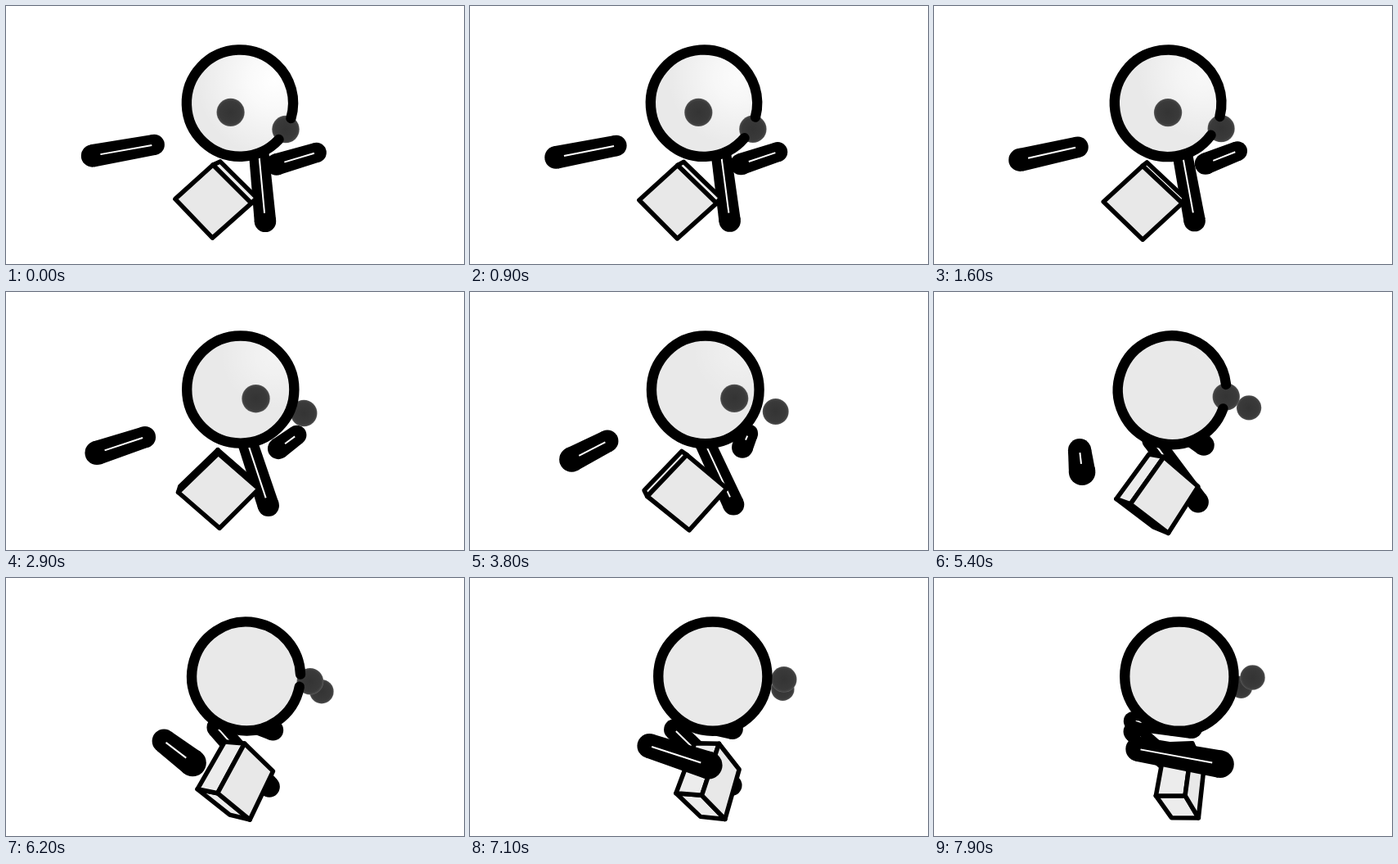
Write an HTML page with a canvas that moves like this. It is 560 by 315 pixels and loops after 8000 ms.

```html
<!DOCTYPE html>
<html lang="en">
<head>
<meta charset="utf-8">
<title>Turning figure</title>
<style>
html, body { margin: 0; width: 100%; height: 100%; overflow: hidden; background: #fff; }
canvas { display: block; width: 560px; height: 315px; }
</style>
</head>
<body>
<canvas id="stage" width="560" height="315"></canvas>
<script>
const ctx = document.getElementById('stage').getContext('2d');
const LOOP = 8000, STEP = 100;
const AXIS = 300, HORIZON = 54, DISTANCE = 568;

// Model points: x to the right, y down from the horizon, z towards the viewer
const HEAD = [-14, 64.5, 1];
const EYES = [[36.3, 83.5, 77], [-21.5, 64.2, 87]];
const LEFT_ARM = [[-178, 118, 48], [-125, 121.5, -30]];
const RIGHT_ARM = [[30, 136, 14], [90, 141, -73]];
const LEG = [[10, 137, -58], [16.5, 203, 16]];
const BOX = {
  corner: [-45.5, 135.5, 18],
  edges: [[45.5, 41.5, 12], [-45.5, 42, -5], [6.5, 3.5, -31]]
};

let sin = 0, cos = 1;

// Slow start, then a steady turn about the vertical axis
function setTurn(seconds) {
  const angle = 77.5 * (Math.cos(0.1) - Math.cos(0.2 * seconds + 0.1)) * Math.PI / 180;
  sin = Math.sin(angle);
  cos = Math.cos(angle);
}

function project([px, py, pz]) {
  const z = pz * cos - px * sin;
  const s = DISTANCE / (DISTANCE - z);
  return { x: AXIS + s * (px * cos + pz * sin), y: HORIZON + s * py, z, s };
}

function disc(p, r, fill) {
  ctx.beginPath();
  ctx.arc(p.x, p.y, r, 0, Math.PI * 2);
  ctx.fillStyle = fill;
  ctx.fill();
}

// Tapered black capsule with a thin white core
function limb(ends) {
  const [far, near] = ends.map(project).sort((a, b) => a.z - b.z);
  const dx = near.x - far.x, dy = near.y - far.y;
  const len = Math.hypot(dx, dy) || 1, ux = dx / len, uy = dy / len;
  const radius = p => 5 + 8 * p.s;
  const side = (p, k) => ctx.lineTo(p.x - uy * radius(p) * k, p.y + ux * radius(p) * k);

  disc(far, radius(far), '#000');
  disc(near, radius(near), '#000');
  ctx.beginPath();
  side(far, 1);
  side(near, 1);
  side(near, -1);
  side(far, -1);
  ctx.fill();

  const from = 3, to = len - 10;
  if (to <= from) return;
  ctx.beginPath();
  ctx.moveTo(far.x + ux * from, far.y + uy * from);
  ctx.lineTo(far.x + ux * to, far.y + uy * to);
  ctx.lineCap = 'butt';
  ctx.lineWidth = 2;
  ctx.strokeStyle = '#fff';
  ctx.stroke();
}

const add = (...vs) => vs.reduce((a, b) => a.map((n, i) => n + b[i]));

// Draws a face only when it is turned towards the viewer
function face(corner, u, v, fill) {
  const pts = [corner, add(corner, u), add(corner, u, v), add(corner, v)].map(project);
  const area = pts.reduce((sum, p, i) => {
    const q = pts[(i + 1) % 4];
    return sum + p.x * q.y - q.x * p.y;
  }, 0);
  if (area <= 0) return;
  ctx.beginPath();
  pts.forEach(p => ctx.lineTo(p.x, p.y));
  ctx.closePath();
  ctx.fillStyle = fill;
  ctx.fill();
  ctx.lineWidth = 5.5;
  ctx.lineJoin = 'round';
  ctx.strokeStyle = '#000';
  ctx.stroke();
}

function drawBox() {
  const { corner, edges: [u, v, w] } = BOX, side = '#ececec';
  face(corner, w, u, side);
  face(add(corner, v), u, w, side);
  face(corner, v, w, side);
  face(add(corner, u), w, v, side);
  face(corner, u, v, '#e8e8e8');
}

function drawEye(p) {
  const r = 14.5 * p.s;
  const g = ctx.createRadialGradient(p.x, p.y, 0, p.x, p.y, r);
  g.addColorStop(0, '#343434');
  g.addColorStop(0.8, '#3a3a3a');
  g.addColorStop(0.94, '#464646');
  g.addColorStop(1, '#666');
  disc(p, r, g);
}

function shadeHead(c, r, seconds) {
  disc(c, r, '#e9e9e9');
  const glow = 1 - seconds / 5.6;
  if (glow <= 0) return;
  const x = c.x + 42, y = c.y - 28 - seconds * 5;
  const g = ctx.createRadialGradient(x, y, 0, x, y, 40 + 55 * glow);
  g.addColorStop(0, `rgba(255,255,255,${glow})`);
  g.addColorStop(0.35, `rgba(255,255,255,${0.75 * glow})`);
  g.addColorStop(1, 'rgba(255,255,255,0)');
  disc(c, r, g);
}

// The outline opens where an eye in front of the head crosses it
function drawRing(c, r, eyes) {
  let start = 0, half = 0;
  for (const e of eyes) {
    const dx = e.x - c.x, dy = e.y - c.y, d = Math.hypot(dx, dy), reach = 13 * e.s;
    const k = (r * r + d * d - reach * reach) / (2 * r * d);
    if (e.z > 0 && k < 1) {
      start = Math.atan2(dy, dx);
      half = Math.acos(k);
    }
  }
  ctx.beginPath();
  ctx.arc(c.x, c.y, r, start + half, start - half + Math.PI * 2);
  ctx.lineCap = 'round';
  ctx.lineWidth = 12.4;
  ctx.strokeStyle = '#000';
  ctx.stroke();
}

function drawHead(seconds) {
  const c = project(HEAD), r = 65 * c.s, eyes = EYES.map(project);
  eyes.filter(e => e.z <= 0).forEach(drawEye);
  shadeHead(c, r, seconds);
  eyes.filter(e => e.z > 0).forEach(drawEye);
  drawRing(c, r, eyes);
}

function draw(seconds) {
  setTurn(seconds);
  ctx.fillStyle = '#fff';
  ctx.fillRect(0, 0, 560, 315);
  limb(RIGHT_ARM);
  limb(LEG);
  drawBox();
  drawHead(seconds);
  limb(LEFT_ARM);
}

const begin = performance.now();
function tick() {
  const t = (performance.now() - begin) % LOOP;
  draw(Math.floor(t / STEP) * STEP / 1000);
  requestAnimationFrame(tick);
}
tick();
</script>
</body>
</html>
```
